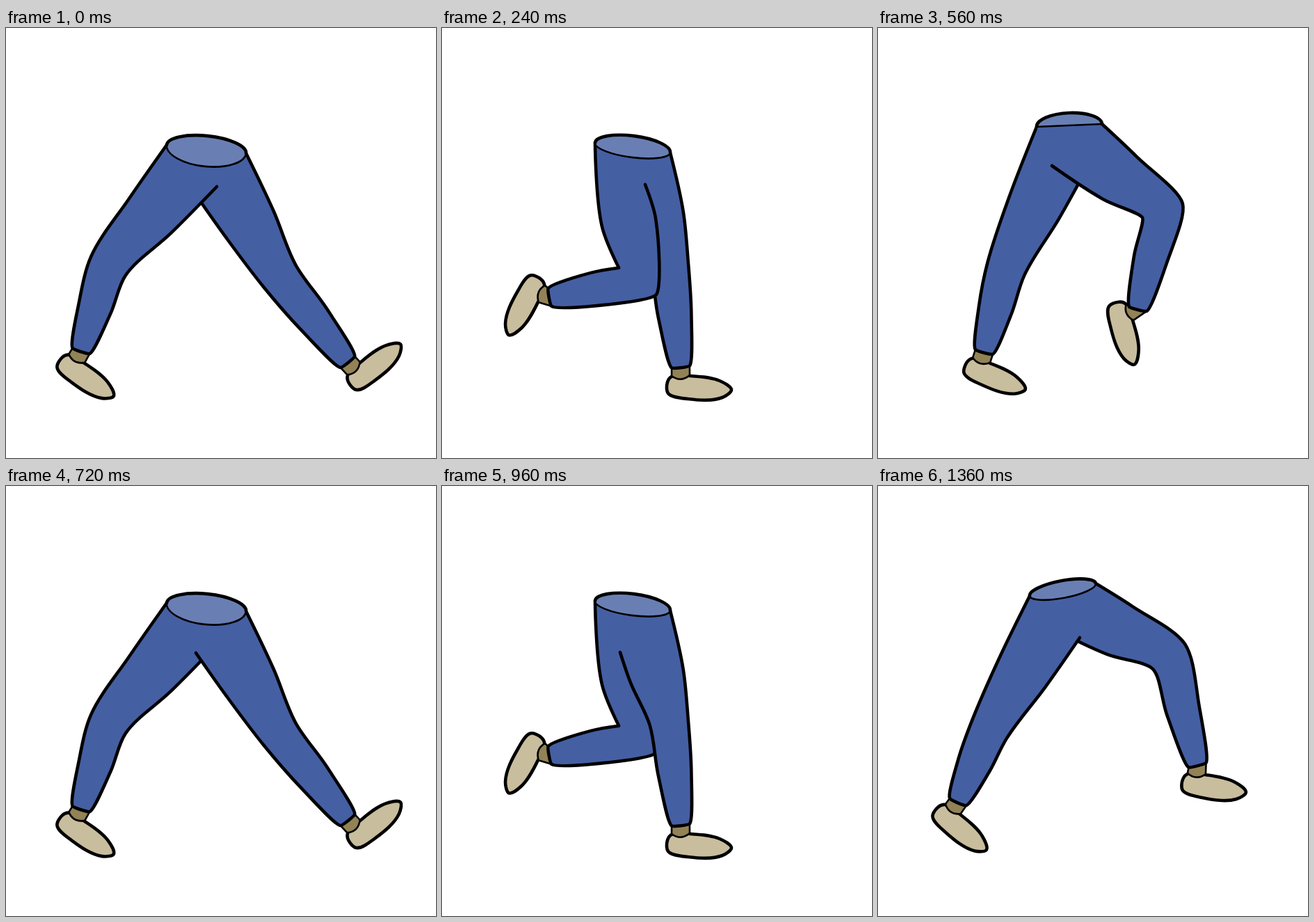
An HTML page with a canvas that plays this animation: 618 px wide and 618 px high, repeating every 1440 ms.

```html
<!DOCTYPE html>
<html lang="en">
<head>
<meta charset="utf-8">
<title>Walking legs</title>
<style>
  html, body { margin: 0; width: 100%; height: 100%; overflow: hidden; background: #fff; }
  canvas { display: block; width: 618px; height: 618px; }
</style>
</head>
<body>
<canvas id="stage" width="618" height="618"></canvas>
<script>
const ctx = document.getElementById('stage').getContext('2d');
const DENIM = '#455fa3', WAIST = '#697fb4', SHOE = '#c8bd9d', SOCK = '#928256';
const INK = 4.6, FINE = 2.6;
const STEP = 80, STEPS = 18, HALF = 9;
const RAD = Math.PI / 180;

// Both legs follow this cycle, half a loop apart: step, knee, ankle, foot angle.
const GAIT = [
  [0, 393, 356, 491, 480, -43],
  [2, 404, 319, 411, 487, 0],
  [3, 326, 338, 343, 487, 0],
  [5, 262, 305, 232, 489, 0],
  [6, 214, 335, 195, 480, 0],
  [8, 160, 350, 115, 454, 35],
  [9, 147, 342, 108, 464, 30],
  [10, 205, 350, 75, 405, 100],
  [11, 264, 358, 115, 372, 103],
  [12, 281, 364, 155, 387, 113],
  [14, 328, 352, 198, 401, 120],
  [15, 386, 306, 280, 417, 125],
  [17, 418, 245, 459, 401, 5]
];
// Step, left end, right end, height of the far rim, drop of the near rim.
const HIPS = [
  [0, 231, 168, 345, 180, 19, 25],
  [2, 227, 161, 327, 177, 17, 14],
  [3, 220, 165, 328, 179, 17, 14],
  [5, 237, 160, 309, 167, 9, -9],
  [6, 241, 146, 332, 153, 14, -14],
  [7, 228, 142, 322, 138, 18, 0],
  [8, 218, 158, 313, 140, 13, 12]
];
const SOLE = [[-13, 14], [-19, 22], [-18, 38], [10, 46], [60, 44], [73, 33], [56, 20], [14, 13]];

const mid = (a, b) => [(a[0] + b[0]) / 2, (a[1] + b[1]) / 2];
const along = (p, dir, d) => [p[0] + dir[0] * d, p[1] + dir[1] * d];
const unit = (a, b) => {
  const d = Math.hypot(b[0] - a[0], b[1] - a[1]) || 1;
  return [(b[0] - a[0]) / d, (b[1] - a[1]) / d];
};
const toBack = dir => [-dir[1], dir[0]];

// Cubic interpolation through the keys of a repeating track.
function sample(keys, period, time) {
  const t = time % period, n = keys.length;
  const key = i => {
    const [start, ...values] = keys[(i + n) % n];
    return { t: start + period * Math.floor(i / n), values };
  };
  let i = n - 1;
  while (keys[i][0] > t) i--;
  const [a, b, c, d] = [key(i - 1), key(i), key(i + 1), key(i + 2)];
  const span = c.t - b.t, u = (t - b.t) / span;
  return b.values.map((v, k) => {
    const m = (c.values[k] - a.values[k]) / (c.t - a.t) * span;
    const w = (d.values[k] - v) / (d.t - b.t) * span;
    const change = c.values[k] - v;
    return v + u * (m + u * (3 * change - 2 * m - w + u * (m + w - 2 * change)));
  });
}

// Smooth curve; open curves turn sharp where they bend tightly.
function curve(points, closed) {
  const n = points.length, at = i => points[(i + n) % n];
  const tangent = i => {
    if (!closed && (i === 0 || i === n - 1)) return [0, 0];
    const u = unit(at(i - 1), at(i)), v = unit(at(i), at(i + 1));
    const k = closed ? 1 : Math.sqrt(Math.max(0, u[0] * v[0] + u[1] * v[1]));
    return [(u[0] + v[0]) * k / 6, (u[1] + v[1]) * k / 6];
  };
  const path = new Path2D();
  path.moveTo(...points[0]);
  for (let i = 0; i < (closed ? n : n - 1); i++) {
    const p = at(i), q = at(i + 1), d = Math.hypot(q[0] - p[0], q[1] - p[1]);
    path.bezierCurveTo(...along(p, tangent(i), d), ...along(q, tangent(i + 1), -d), ...q);
  }
  return path;
}

function paint(path, fill, width) {
  if (fill) { ctx.fillStyle = fill; ctx.fill(path); }
  if (width) { ctx.lineWidth = width; ctx.stroke(path); }
}

function drawFoot(ankle, angle, ankleBack, ankleFront) {
  const c = Math.cos(angle * RAD), s = Math.sin(angle * RAD);
  const place = ([x, y]) => [ankle[0] + x * c - y * s, ankle[1] + x * s + y * c];
  paint(curve(SOLE.map(place), true), SHOE, INK);

  const sock = new Path2D();
  sock.moveTo(...ankleBack);
  sock.lineTo(...ankleFront);
  sock.lineTo(...place([13, 12]));
  sock.quadraticCurveTo(...place([0, 23]), ...place([-13, 13]));
  sock.closePath();
  paint(sock, SOCK, FINE);
}

// backTop and frontTop are where the two sides of the thigh meet the hips.
function drawLeg(step, backTop, frontTop) {
  const [kx, ky, ax, ay, angle] = sample(GAIT, STEPS, step);
  const knee = [kx, ky], ankle = [ax, ay], top = mid(backTop, frontTop);
  const thigh = unit(top, knee), shin = unit(knee, ankle);
  const bisector = unit([0, 0], [thigh[0] + shin[0], thigh[1] + shin[1]]);
  const halfBend = Math.hypot(thigh[0] + shin[0], thigh[1] + shin[1]) / 2;
  const sections = [
    [mid(top, knee), thigh, 39],
    [knee, bisector, 28 / Math.sqrt(halfBend)],
    [mid(knee, ankle), shin, 24],
    [ankle, shin, 13]
  ];
  const back = sections.map(([p, dir, w]) => along(p, toBack(dir), w));
  const front = sections.map(([p, dir, w]) => along(p, toBack(dir), -w)).reverse();

  drawFoot(ankle, angle, back[3], front[0]);
  paint(curve([backTop, ...back, ...front, frontTop]), DENIM, INK);
}

function drawWaist(left, right, rise, drop) {
  const [cx, cy] = mid(left, right);
  const rx = Math.hypot(right[0] - left[0], right[1] - left[1]) / 2;
  const tilt = Math.atan2(right[1] - left[1], right[0] - left[0]);
  const addRim = path => path.ellipse(cx, cy, rx, rise, tilt, Math.PI, 2 * Math.PI);
  const addHem = path => drop < 0
    ? path.ellipse(cx, cy, rx, -drop, tilt, 2 * Math.PI, Math.PI, true)
    : path.ellipse(cx, cy, rx, drop, tilt, 0, Math.PI);

  const rim = new Path2D(), hem = new Path2D(), opening = new Path2D();
  addRim(rim);
  addHem(hem);
  addRim(opening);
  addHem(opening);
  paint(rim, DENIM);
  paint(opening, WAIST);
  paint(hem, null, FINE);
  paint(rim, null, INK);
}

function drawPose(step) {
  const phase = step % HALF;
  const [lx, ly, rx, ry, rise, drop] = sample(HIPS, HALF, phase);
  const left = [lx, ly], right = [rx, ry];
  const rearCrease = [lx + 72, ly + 60], foreCrease = [rx - 72, ry + 60];

  ctx.fillStyle = '#fff';
  ctx.fillRect(0, 0, 618, 618);
  ctx.strokeStyle = '#000';
  ctx.lineCap = ctx.lineJoin = 'round';

  const drawRear = s => drawLeg(s, left, rearCrease);
  const drawFore = s => drawLeg(s, foreCrease, right);
  const swingIsRear = phase < 4, swingIsNear = step < HALF;
  const drawSwing = () => (swingIsRear ? drawRear : drawFore)(phase + HALF);
  const drawStance = () => (swingIsRear ? drawFore : drawRear)(phase);

  (swingIsNear ? drawStance : drawSwing)();
  const seat = new Path2D();
  [left, right, rearCrease, foreCrease].forEach(p => seat.lineTo(...p));
  paint(seat, DENIM);
  (swingIsNear ? drawSwing : drawStance)();
  drawWaist(left, right, rise, drop);
}

function tick() {
  drawPose(Math.floor(performance.now() / STEP) % STEPS);
  requestAnimationFrame(tick);
}
tick();
</script>
</body>
</html>
```
